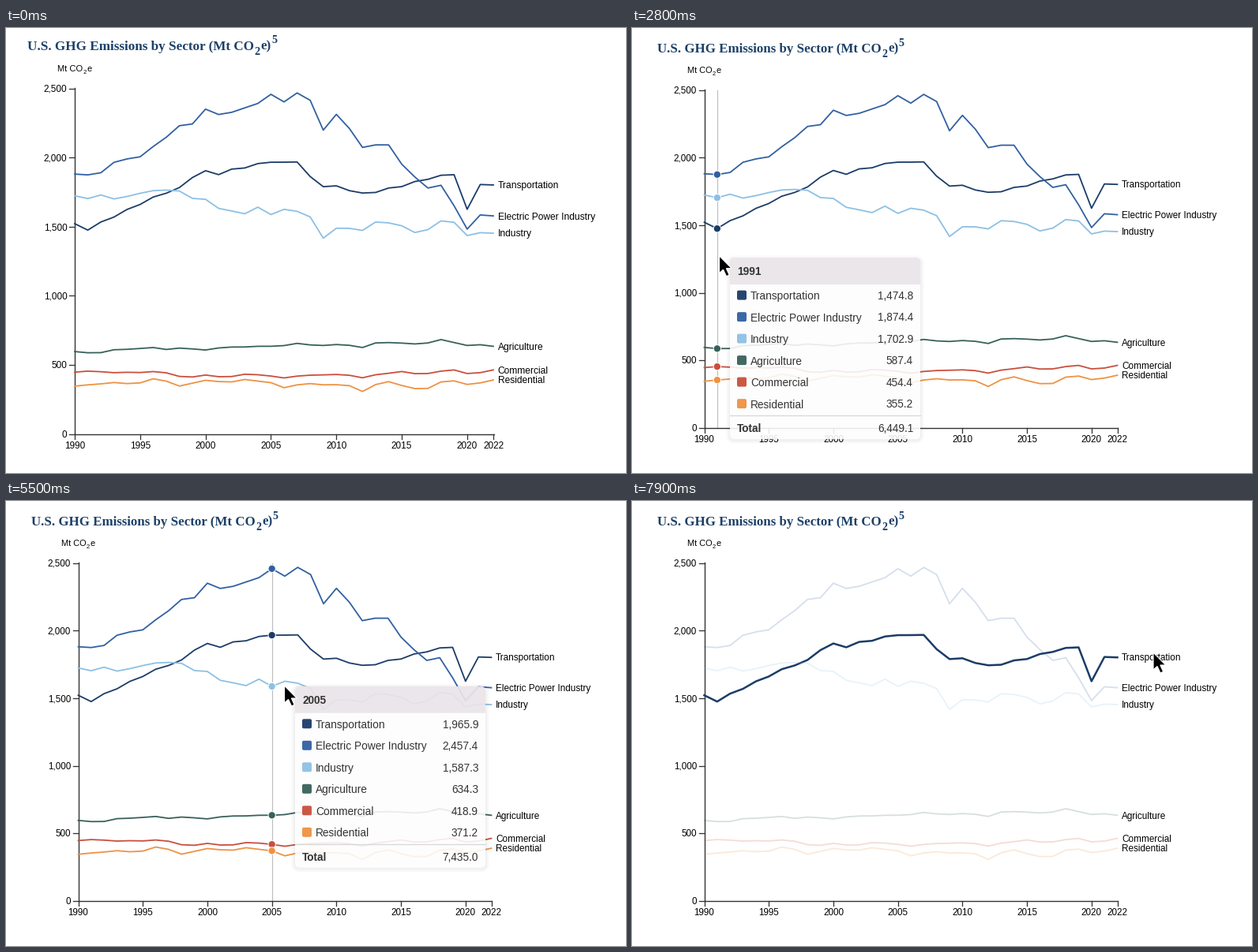
Write a matplotlib script that moves like this. It is 785 px wide and 564 px high and loops after 8 s.

```python
import matplotlib.pyplot as plt
import numpy as np
from matplotlib.animation import FuncAnimation
from matplotlib.patches import Polygon
from matplotlib.transforms import Affine2D

W, H, DPI = 785, 564, 100
FRAMES, INTERVAL = 80, 100
PT = 72 / DPI
LEFT, RIGHT, TOP, BASE = 91.5, 614.5, 78.5, 507
STEP = (RIGHT - LEFT) / 32
INK, NAVY = "#333333", "#1d4068"

transportation = [
    1521.4, 1474.8, 1533.6, 1569.2, 1624.3, 1660.4, 1714.1, 1741.8, 1782.7, 1855.3, 1904.6,
    1876.2, 1916.1, 1924.4, 1956.2, 1965.9, 1966.3, 1967.8, 1862.4, 1789.1, 1795.2, 1760.3,
    1743.1, 1747.2, 1779.4, 1789.4, 1826.3, 1842.2, 1871.6, 1875.7, 1625.3, 1804.7, 1801.5]
electric = [
    1880.2, 1874.4, 1889.9, 1965.1, 1989.8, 2005.3, 2079.6, 2146.7, 2230.1, 2242.9, 2350.2,
    2311.3, 2327.1, 2359.2, 2391.3, 2457.4, 2402.4, 2467.3, 2414.2, 2198.1, 2312.3, 2209.8,
    2073.2, 2091.4, 2091.2, 1951.7, 1859.2, 1779.3, 1799.2, 1650.9, 1482.2, 1584.4, 1577.5]
industry = [
    1723.3, 1702.9, 1729.1, 1700.4, 1718.3, 1741.2, 1760.3, 1764.4, 1757.8, 1704.3, 1697.6,
    1632.2, 1613.4, 1593.1, 1640.8, 1587.3, 1625.2, 1610.9, 1570.3, 1416.4, 1488.3, 1487.6,
    1472.4, 1533.2, 1527.1, 1506.1, 1457.3, 1478.2, 1541.4, 1531.3, 1435.2, 1456.1, 1452.5]
agriculture = [
    596.0, 587.4, 588.2, 609.1, 612.3, 618.4, 625.2, 611.3, 621.0, 615.2, 607.4,
    622.1, 628.7, 629.3, 634.1, 634.3, 639.2, 655.3, 644.2, 640.1, 646.8, 641.2,
    625.3, 658.4, 661.1, 657.4, 651.2, 658.3, 682.8, 661.3, 640.2, 645.4, 634.0]
commercial = [
    447.0, 454.4, 450.2, 443.3, 446.1, 444.4, 451.3, 442.2, 416.3, 412.1, 426.3,
    414.2, 415.4, 432.1, 428.3, 418.9, 405.2, 418.4, 425.1, 427.3, 430.2, 424.4,
    406.3, 428.2, 439.1, 451.7, 436.4, 437.2, 454.3, 463.1, 437.2, 443.4, 463.3]
residential = [
    345.6, 355.2, 362.3, 372.1, 364.4, 369.2, 399.3, 382.1, 346.5, 367.3, 388.2,
    379.1, 376.4, 394.2, 382.3, 371.2, 334.4, 355.1, 364.3, 355.4, 356.2, 349.3,
    307.2, 357.1, 378.4, 350.7, 328.3, 329.4, 376.2, 384.1, 358.3, 369.4, 390.2]

SECTORS = [
    ("Transportation", transportation, "#1b3c67"),
    ("Electric Power Industry", electric, "#3160a2"),
    ("Industry", industry, "#8dc0e4"),
    ("Agriculture", agriculture, "#37615a"),
    ("Commercial", commercial, "#c94f3d"),
    ("Residential", residential, "#ee9243"),
]

# Pointer path: time in ms, then tip position.
PATH_T = [800, 1200, 1600, 2000, 2600, 3400, 3700, 4300, 4600, 5500, 6100, 6300, 6700, 7000, 7300, 7900]
PATH_X = [425, 250, 112, 116, 112, 106, 108, 175, 233, 352.5, 458, 513, 580, 608, 640, 660]
PATH_Y = [495, 470, 450, 377, 297, 264, 260.5, 245, 236, 234, 246, 256, 262, 252, 225, 192]


def pointer(t):
    return np.interp(t, PATH_T, PATH_X), np.interp(t, PATH_T, PATH_Y)


def year_x(year):
    return LEFT + (year - 1990) * STEP


def value_y(value):
    return BASE - np.asarray(value) * (BASE - TOP) / 2500


fig = plt.figure(figsize=(W / DPI, H / DPI), dpi=DPI, facecolor="white")
ax = fig.add_axes([0, 0, 1, 1])
ax.axis("off")


def text(x, y, s, px, color="black", family="Liberation Sans", **kw):
    """Text whose line is centred on y, sized in pixels."""
    return ax.text(x, y + 0.36 * px, s, fontsize=px * PT, color=color,
                   family=family, va="baseline", **kw)


def stroke(xs, ys, color, px, **kw):
    return ax.plot(xs, ys, color=color, lw=px * PT, **kw)[0]


def panel(x0, y0, x1, y1, r_top, r_bottom, color, alpha, z, transform):
    """Box with separately rounded top and bottom corners."""
    corners = [(x0, y0, 1, 1, r_top, 180), (x1, y0, -1, 1, r_top, 270),
               (x1, y1, -1, -1, r_bottom, 0), (x0, y1, 1, -1, r_bottom, 90)]
    points = []
    for x, y, sx, sy, r, start in corners:
        a = np.radians(np.linspace(start, start + 90, 7))
        points += list(zip(x + sx * r + r * np.cos(a), y + sy * r + r * np.sin(a)))
    return ax.add_patch(Polygon(points, fc=color, ec="none", alpha=alpha,
                                zorder=z, transform=transform))


# Title and unit label
serif = dict(color=NAVY, family="Liberation Serif", weight="bold")
base_texts = [
    text(32, 24.5, "U.S. GHG Emissions by Sector (Mt CO", 16.9, **serif),
    text(316, 32, "2", 14, **serif),
    text(324, 24.5, "e)", 16.9, **serif),
    text(337.5, 17.5, "5", 14, **serif),
    text(70, 53.5, "Mt CO", 11, ),
    text(102, 57.5, "2", 7.5),
    text(106.8, 53.5, "e", 11),
]

# Axes
stroke([LEFT, LEFT], [TOP - 0.6, BASE], INK, 1.4, zorder=3)
stroke([LEFT, RIGHT + 0.6], [BASE, BASE], INK, 1.4, zorder=3)
for v in range(0, 2501, 500):
    stroke([LEFT - 7, LEFT], [value_y(v)] * 2, INK, 1.3, zorder=3)
    base_texts.append(text(82, value_y(v), f"{v:,}", 11.6, ha="right"))
for year in [*range(1990, 2021, 5), 2022]:
    stroke([year_x(year)] * 2, [BASE, BASE + 6], INK, 1.3, zorder=3)
    base_texts.append(text(year_x(year), 521, str(year), 11.6, ha="center"))

# Series with their labels
years = np.arange(1990, 2023)
lines, label_ys = [], []
for name, values, color in SECTORS:
    lines.append(stroke(year_x(years), value_y(values), color, 1.8, zorder=4,
                        solid_joinstyle="round"))
    label_ys.append(value_y(values[-1]))
    base_texts.append(text(620, label_ys[-1], name, 11.8))
base_sizes = [t.get_fontsize() for t in base_texts]

# Hover rule and dots
rule = stroke([LEFT, LEFT], [TOP, BASE], "#bdbdbd", 1.2, zorder=2)
dots = ax.scatter([LEFT] * 6, [BASE] * 6, s=45, c=[c for *_, c in SECTORS],
                  edgecolors="white", linewidths=0.7, zorder=6)

# Tooltip, laid out from its own top left corner
tip_shift = Affine2D()
tip_space = tip_shift + ax.transData
in_tip = dict(color=INK, zorder=12, transform=tip_space)
tip_w, tip_h, head_h = 241, 230, 34
tip = [panel(-k, 2 - k, tip_w + k, tip_h + 1 + k, 5 + k, 5 + k, "black", 0.013, 9, tip_space)
       for k in range(1, 6)]
tip.append(panel(0, 0, tip_w, head_h, 5, 0, "#ebe6ea", 0.92, 10, tip_space))
tip.append(panel(0, head_h, tip_w, tip_h, 0, 5, "white", 0.89, 10, tip_space))
tip.append(stroke([0, tip_w], [200, 200], "#d8d8d8", 1.3, zorder=11, transform=tip_space))
tip_year = text(9, 17.5, "", 13.6, weight="bold", **in_tip)
tip_total = text(232, 216, "", 13.6, ha="right", **in_tip)
tip += [tip_year, tip_total, text(9, 216, "Total", 13.6, weight="bold", **in_tip)]
tip_values = []
for i, (name, _, color) in enumerate(SECTORS):
    y = 48 + 27.5 * i
    tip.append(panel(9, y - 6.5, 21, y + 5.5, 2, 2, color, 0.95, 11, tip_space))
    tip.append(text(26, y, name, 13.75, **in_tip))
    tip_values.append(text(232, y, "", 13.6, ha="right", **in_tip))
tip += tip_values

# Arrow pointer
arrow_shift = Affine2D()
arrow = ax.add_patch(Polygon(
    [(0, 0), (0, 22), (5, 17.5), (9, 26), (12.7, 24.3), (8.9, 16), (15.8, 16)],
    fc="black", ec="white", lw=1.2 * PT, zorder=20, transform=arrow_shift + ax.transData))


def set_zoom(z):
    sx, sy = 1 + 0.0134 * z, 1 + 0.022 * z
    ox, oy = LEFT - 4.5 * z, BASE + 7.5 * z
    ax.set_xlim(LEFT - ox / sx, LEFT + (W - ox) / sx)
    ax.set_ylim(BASE + (H - oy) / sy, BASE - oy / sy)
    for item, size in zip(base_texts, base_sizes):
        item.set_fontsize(size * sx)


def show_year(index):
    values = [series[index] for _, series, _ in SECTORS]
    x = year_x(1990 + index)
    rule.set_xdata([x, x])
    dots.set_offsets(np.column_stack([[x] * 6, value_y(values)]))
    tip_year.set_text(str(1990 + index))
    tip_total.set_text(f"{sum(values):,.1f}")
    for item, value in zip(tip_values, values):
        item.set_text(f"{value:,.1f}")


def update(frame):
    t = frame * INTERVAL
    set_zoom(max(0, 1 - frame / 2))
    x, y = pointer(t)
    present = t >= 800
    inside = present and x < 618 and y < BASE
    arrow.set_visible(present)
    arrow_shift.clear().translate(x, y)

    for artist in [rule, dots, *tip]:
        artist.set_visible(inside)
    if inside:
        show_year(int(np.clip((x - LEFT - 1) // STEP, 0, 32)))
        tip_shift.clear().translate(x + 13.5, pointer(t - 40)[1] + 0.7)

    # Pointing at a label brings its line forward
    near = [present and x >= 620 and abs(y - ly) < 8 for ly in label_ys]
    for line, active in zip(lines, near):
        line.set_alpha(0.2 if any(near) and not active else 1)
        line.set_linewidth((2.5 if active else 1.8) * PT)
    return []


animation = FuncAnimation(fig, update, frames=FRAMES, interval=INTERVAL,
                          repeat=True, repeat_delay=0, blit=False)
plt.show()
```
